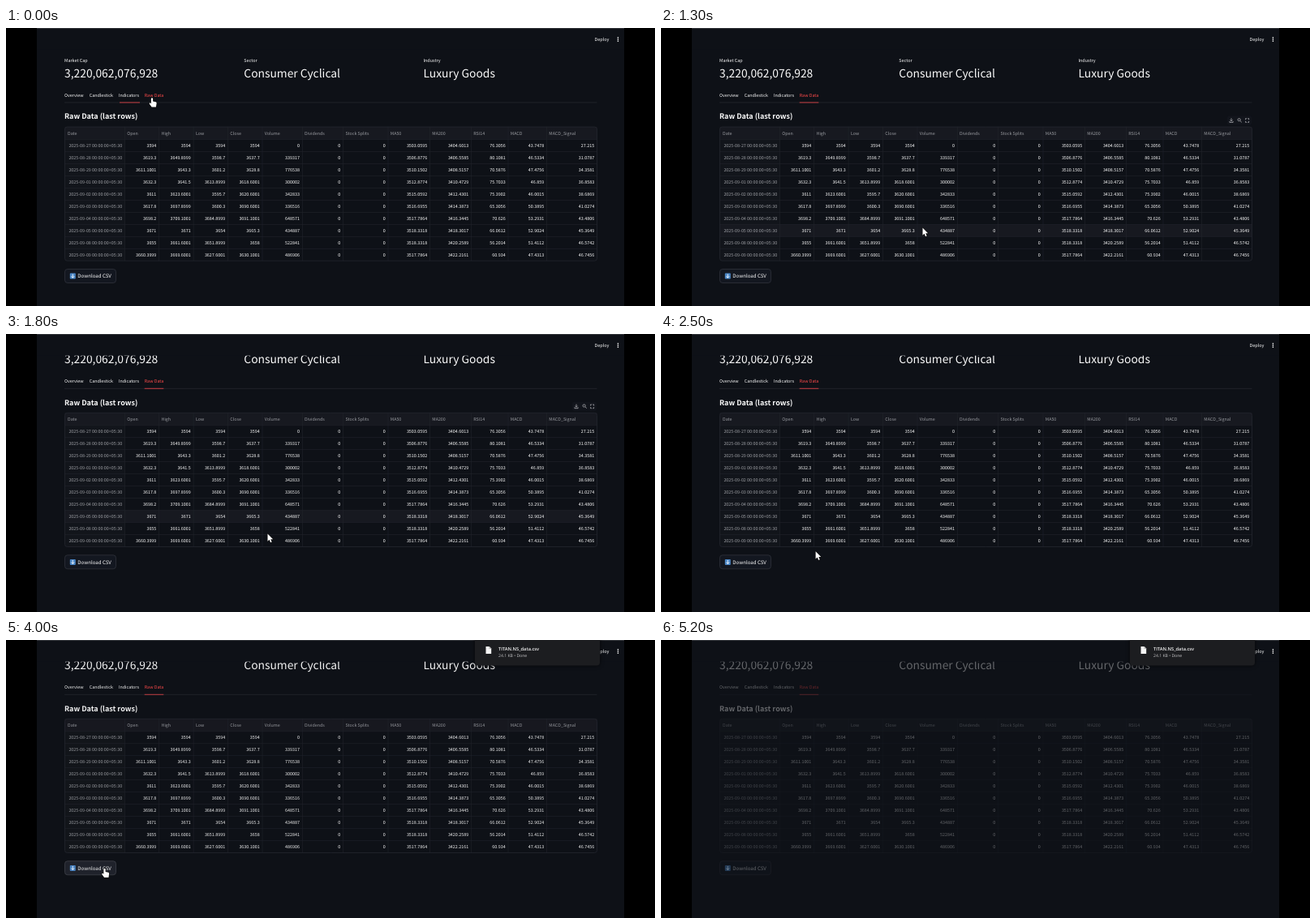
Animation of 800 by 343 pixels, one loop 5.3 s. Source, as an HTML page with a canvas:

```html
<!DOCTYPE html>
<html lang="en">
<head>
<meta charset="utf-8">
<title>Raw data table</title>
<style>
html, body { margin: 0; height: 100%; overflow: hidden; background: #000; }
canvas { display: block; }
</style>
</head>
<body>
<canvas id="stage" width="800" height="343"></canvas>
<script>
const ctx = document.getElementById('stage').getContext('2d');
const LOOP = 5300, STEP = 100;
const SANS = '"Noto Sans CJK JP", "Noto Sans CJK SC", "Noto Sans CJK", "Noto Sans", sans-serif';
const UI = '"Open Sans", "Noto Sans", sans-serif';
const PAGE = '#0e1117', WHITE = '#fafafa', RED = '#ff4b4b', GREY = '#999ba0', GRID = '#20232b';

const TABLE = { left: 72.5, right: 728.5, top: 122, body: 137.5, row: 14.97 };
const widths = { Date: 74, Open: 42.2, High: 42.4, Low: 42.4, Close: 42.5, Volume: 49.3, Dividends: 50.4,
  'Stock Splits': 55.3, MA50: 51.5, MA200: 51, RSI14: 45.5, MACD: 47.5, MACD_Signal: 62 };
let edge = TABLE.left;
const columns = Object.entries(widths).map(([name, width]) => ({ name, left: edge, right: edge += width }));
const rows = makeRows([3594, 3637.7, 3628.8, 3618.6, 3620.6, 3690.6, 3691.1, 3665.3, 3658, 3630.1]);

function random(n) {
  const v = Math.sin(n * 12.9898) * 43758.5453;
  return v - Math.floor(v);
}

// Daily prices around the closes, with moving averages, RSI and MACD.
function makeRows(closes) {
  const round = v => String(+v.toFixed(4));
  const price = v => round(Math.fround(v.toFixed(1)));
  const day = new Date(Date.UTC(2025, 7, 27));
  let fast = 3562.1576, slow = 3518.4098, signal = 27.215;
  return closes.map((close, i) => {
    const open = i ? closes[i - 1] + 60 * (random(i) - 0.5) : close;
    const high = Math.max(open, close) + (i && 22 * random(i + 20));
    const low = Math.min(open, close) - (i && 22 * random(i + 40));
    const volume = i && Math.floor(290000 + 600000 * random(i + 60));
    if (i) {
      fast += (close - fast) * 2 / 13;
      slow += (close - slow) * 2 / 27;
      signal += (fast - slow - signal) / 5;
    }
    const ma50 = 3518.4 - 15.3405 * (1 - i / 7.5) ** 2;
    const ma200 = 3404.6013 + 1.9572 * i;
    const rsi = 76.3056 - 0.24 * i * i + 5 * Math.sin(i * 2.2);
    const date = day.toISOString().slice(0, 10);
    do day.setUTCDate(day.getUTCDate() + 1); while (day.getUTCDay() % 6 === 0);
    return [`${date} 00:00:00+05:30`, ...[open, high, low, close].map(price), volume, 0, 0,
      ...[ma50, ma200, rsi, fast - slow, signal].map(round)];
  });
}

// Pointer moves: start time, end time and where the tip arrives.
const pointerStart = [180, 86.5];
const pointerMoves = [[200, 1200, 322.5, 246.5], [1900, 2900, 119, 280], [3300, 3700, 121.5, 282],
  [4100, 4400, 131.5, 282], [4400, 5100, 260, -16]];
const arrow = new Path2D('M0 0V9.2L2.1 7.3 3.6 10.7 5.1 10 3.7 6.8H6.6Z');
const hand = new Path2D('M-1.1.9A1.1 1.1 0 0 1 1.1.9V4.1L4.6 4.8Q5.8 5.1 5.6 6.4L4.9 11H-.4L-3.3 7.1Q-3.6 5.8-2.4 5.7L-1.1 6.8Z');

const progress = (t, from, to) => Math.min(1, Math.max(0, (t - from) / (to - from)));
const smooth = p => p * p * (3 - 2 * p);
const mix = (a, b, p) => a + (b - a) * p;

function pointerAt(t) {
  return pointerMoves.reduce(([x, y], [from, to, toX, toY]) => {
    const p = smooth(progress(t, from, to));
    return [mix(x, toX, p), mix(y, toY, p)];
  }, pointerStart);
}

function text(str, x, y, size, color = WHITE, { weight = 400, align = 'left', font = SANS } = {}) {
  ctx.font = `${weight} ${size}px ${font}`;
  ctx.textRendering = 'geometricPrecision';
  ctx.textAlign = align;
  ctx.fillStyle = color;
  ctx.fillText(str, x, y + size * 0.36);
}

function rect(x, y, w, h, color) {
  ctx.fillStyle = color;
  ctx.fillRect(x, y, w, h);
}

function box(x, y, w, h, r, fill, stroke) {
  ctx.beginPath();
  ctx.roundRect(x, y, w, h, r);
  ctx.fillStyle = fill;
  ctx.fill();
  if (stroke) line(stroke, 0.7);
}

function line(color, width, path) {
  ctx.strokeStyle = color;
  ctx.lineWidth = width;
  path ? ctx.stroke(new Path2D(path)) : ctx.stroke();
}

function drawSummary(t) {
  [['Market Cap', '3,220,062,076,928', 72], ['Sector', 'Consumer Cyclical', 293.3], ['Industry', 'Luxury Goods', 514.4]]
    .forEach(([label, value, x]) => {
      text(label, x, 40.2, 5.45);
      text(value, x, 56.2, 13.85);
    });
  [['Overview', 72], ['Candlestick', 102.7], ['Indicators', 138.8], ['Raw Data', 170.7]]
    .forEach(([label, x], i) => text(label, x, 83.2, 5.4, i === 3 ? RED : WHITE));
  rect(72, 91.6, 656.5, 0.7, '#262830');
  const p = smooth(progress(t, 0, 300));
  const left = mix(140, 170.7, p);
  rect(left, 91.5, mix(165, 194.3, p) - left, 0.9, '#d94145');
  text('Raw Data (last rows)', 72, 109, 9, WHITE, { weight: 600 });
}

function drawTable(hoverRow) {
  const { left, right, top, body, row } = TABLE;
  const width = right - left, bottom = body + rows.length * row;
  rect(left, top, width, body - top, '#171920');
  rect(left, body, columns[0].right - left, bottom - body, '#12151b');
  if (hoverRow >= 0) rect(left, body + hoverRow * row, width, row, '#171920');
  rows.forEach((_, i) => rect(left, body + i * row - 0.3, width, 0.6, GRID));
  columns.slice(1).forEach(column => rect(column.left - 0.3, top, 0.6, bottom - top, GRID));
  ctx.beginPath();
  ctx.roundRect(left, top, width, bottom - top, 3);
  line('#262932', 0.7);
  columns.forEach((column, c) => {
    text(column.name, column.left + (c ? 2.8 : 3.5), 130.2, 5.35, GREY);
    rows.forEach((cells, r) =>
      text(cells[c], column.right - 3.4, body + (r + 0.5) * row + 0.2, 5.35, c ? WHITE : GREY, { align: 'right' }));
  });
}

function drawToolbar() {
  box(698, 108.5, 30, 11, 2, '#12151c');
  line('#b4b5b9', 0.75, 'M703 111.3v3.6m-1.5-1.5 1.5 1.5 1.5-1.5M700.9 115v1.4h4.2V115M713.9 114.5l1.9 1.9'
    + 'M714.2 113.2a1.6 1.6 0 1 0-3.2 0 1.6 1.6 0 1 0 3.2 0M720.6 113.2v-1.5h1.4M723.2 111.7h1.4v1.5M724.6 114.9v1.5h-1.4M722 116.4h-1.4v-1.5');
}

function drawButton(hover) {
  box(72.5, 297.5, 63, 17, 3.4, hover ? '#20232c' : '#131720', hover ? '#454850' : '#34373f');
  box(78.8, 302.6, 7, 7, 0.8, '#4a86c5');
  line('#fff', 0.9, 'M82.3 303.7v4.5m-1.9-1.9 1.9 1.9 1.9-1.9');
  text('Download CSV', 88.3, 306.1, 6.15);
}

// Round download badge that peeks in at the left edge of the page.
function drawBadge(t) {
  const x = 38 - 16 * smooth(Math.abs(t - 3200) / 300);
  ctx.beginPath();
  ctx.arc(x, 97, 14.5, 0, 7);
  ctx.fillStyle = '#303237';
  ctx.fill();
  ctx.save();
  ctx.translate(x, 97);
  line('#85878b', 1, 'M0-5V2m-3-3 3 3 3-3M-5 2v3H5V2');
  ctx.restore();
}

function drawNotice(t) {
  ctx.save();
  ctx.translate(0, -42 * (1 - smooth(progress(t, 3200, 3600))));
  ctx.shadowColor = '#000a';
  ctx.shadowBlur = 5;
  box(578, -8, 154, 39.5, 4, '#1c1d20');
  ctx.shadowBlur = 0;
  ctx.fillStyle = '#f4f4f4';
  ctx.fill(new Path2D('M591.5 8h4.3l2.4 2.4V17h-6.7Z'));
  line('#8a8a8a', 0.6, 'M595.8 8v2.4h2.4');
  text('TITAN.NS_data.csv', 607, 11, 5.7, '#f2f2f2', { weight: 600, font: UI });
  text('24.1 KB • Done', 607, 19.2, 5.1, '#c4c4c6', { font: UI });
  ctx.restore();
}

function drawPointer(x, y, shape) {
  ctx.save();
  ctx.translate(x, y);
  ctx.lineJoin = 'round';
  ctx.strokeStyle = '#111';
  ctx.lineWidth = 1.4;
  ctx.stroke(shape);
  ctx.fillStyle = '#fff';
  ctx.fill(shape);
  ctx.restore();
}

function draw(t) {
  const scroll = 24.7 * smooth(progress(t, 1300, 1800));
  const [x, y] = pointerAt(t);
  // Row hover only follows the scroll once the pointer moves again.
  const pageY = y + (t < 2000 ? 0 : scroll);
  const row = Math.floor((pageY - TABLE.body) / TABLE.row);
  const overTable = t < 4400 && x > TABLE.left && x < TABLE.right && pageY > TABLE.top && row < rows.length;
  const overButton = x > 72 && x < 136 && pageY > 297 && pageY < 315;
  const overTab = x > 170 && x < 195 && pageY > 78 && pageY < 93;

  rect(0, 0, 800, 343, '#000');
  rect(38, 0, 724, 343, PAGE);
  ctx.save();
  ctx.beginPath();
  ctx.rect(38, 0, 724, 343);
  ctx.clip();
  ctx.save();
  ctx.translate(0, -scroll);
  ctx.globalAlpha = 1 - 0.64 * progress(t, 3800, 4800) ** 1.7;
  drawSummary(t);
  drawTable(overTable ? row : -1);
  if (overTable) drawToolbar();
  drawButton(overButton);
  ctx.restore();

  rect(38, 0, 724, 26.7, PAGE);
  rect(38, 0, 724, 1, '#33353a');
  text('Deploy', 725.5, 14, 5.5);
  [11.8, 14, 16.2].forEach(dotY => rect(753.7, dotY - 0.7, 1.4, 1.4, WHITE));
  if (t >= 3100 && t < 3500) drawBadge(t);
  if (t > 3200) drawNotice(t);
  drawPointer(x, y, overButton || overTab ? hand : arrow);
  ctx.restore();
}

function tick() {
  draw(Math.floor(performance.now() % LOOP / STEP) * STEP);
  requestAnimationFrame(tick);
}
tick();
</script>
</body>
</html>
```
